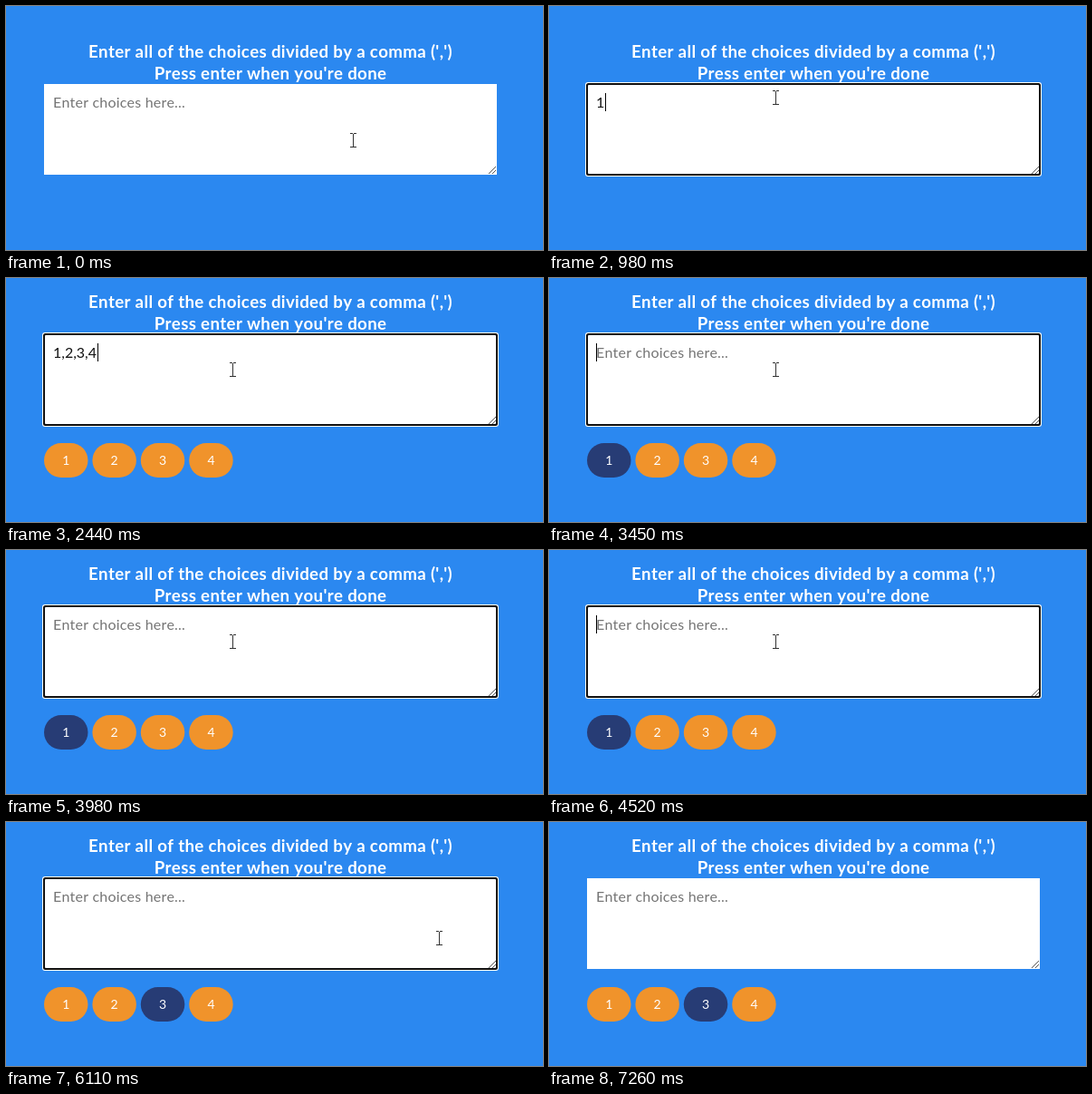
An HTML page with a canvas for the animation above (7.34 s loop, 593 by 269 pixels).

```html
<!DOCTYPE html>
<html lang="en">
<head>
<meta charset="utf-8">
<title>Random choice picker</title>
<style>
  html, body { margin: 0; width: 100%; height: 100%; overflow: hidden; background: #2b88f0; }
  canvas { display: block; }
</style>
</head>
<body>
<canvas id="stage" width="593" height="269"></canvas>
<script>
const ctx = document.getElementById('stage').getContext('2d');
const LOOP = 7340, FOCUS = 210, LAYOUT = 1130, ENTER = 2910, BLUR = 7260;
const BLINK = 530, PICK_START = 3010, PICK_STEP = 100, FINAL_AT = 6110, FINAL = 3;
const PICKS = '3224132241341231424414332412410';

// Time of each typed character, and of each tag's appearance
const KEYS = [[980, '1'], [1350, ','], [1580, '2'], [1740, ','],
              [1890, '3'], [2040, ','], [2370, '4']];
const TAGS = [1130, 1660, 1960, 2440];

// Pointer path: time, x, y
const PATH = [[0, 383, 148], [70, 376, 146], [140, 318, 124], [200, 262, 104], [270, 250, 101],
              [5900, 250, 101], [6110, 478, 128], [6270, 556, 168], [6420, 606, 204]];

function pointerAt(t) {
  const i = PATH.findIndex(p => p[0] > t);
  if (i < 1) return null;
  const [t0, x0, y0] = PATH[i - 1], [t1, x1, y1] = PATH[i];
  const k = (t - t0) / (t1 - t0);
  return [Math.round(x0 + (x1 - x0) * k), Math.round(y0 + (y1 - y0) * k)];
}

function text(str, x, y, color, size, { weight = 400, align = 'left', spacing = 0 } = {}) {
  ctx.font = `${weight} ${size}px Lato, "Open Sans", sans-serif`;
  ctx.fontKerning = 'none';
  ctx.letterSpacing = spacing + 'px';
  ctx.textAlign = align;
  ctx.fillStyle = color;
  ctx.fillText(str, x, y);
  return ctx.measureText(str).width;
}

function box(x, y, w, h, r, color) {
  ctx.fillStyle = color;
  ctx.beginPath();
  ctx.roundRect(x, y, w, h, r);
  ctx.fill();
}

function caretOn(t) {
  const start = t < KEYS[0][0] ? FOCUS : t < 3000 ? t : 3000;
  return Math.floor((t - start) / BLINK) % 2 === 0;
}

function pickedTag(t) {
  if (t >= FINAL_AT) return FINAL;
  return t < PICK_START ? 0 : +PICKS[Math.floor((t - PICK_START) / PICK_STEP)];
}

function drawField(t, top) {
  const focused = t >= FOCUS && t < BLUR;
  if (focused) {
    box(40, top - 2, 504, 104, 3, '#fff');
    box(41, top - 1, 502, 102, 2.5, '#101010');
    box(43, top + 1, 498, 98, 1, '#fff');
  } else {
    box(42, top, 500, 100, 0, '#fff');
  }

  ctx.strokeStyle = '#555';
  ctx.lineWidth = 1;
  ctx.beginPath();
  for (const d of [8, 4]) {
    ctx.moveTo(541 - d, top + 99);
    ctx.lineTo(541, top + 99 - d);
  }
  ctx.stroke();

  const typed = t < ENTER ? KEYS.filter(k => k[0] <= t).map(k => k[1]).join('') : '';
  let caret = 52;
  if (typed) caret += text(typed, 52, top + 26, '#111', 16);
  else text('Enter choices here...', 52, top + 26, '#757575', 16, { spacing: 0.2 });
  if (focused && caretOn(t)) {
    ctx.fillStyle = '#000';
    ctx.fillRect(Math.ceil(caret), top + 10, 1, 20);
  }
}

function drawTags(t) {
  const picked = pickedTag(t);
  TAGS.forEach((at, i) => {
    if (t < at) return;
    const x = 42 + i * 53.4;
    box(x, 182, 48.5, 38, 19, picked === i + 1 ? '#273c75' : '#f0932b');
    text(String(i + 1), x + 24.25, 206, '#fff', 14, { align: 'center' });
  });
}

function drawPointer(t, top) {
  const p = pointerAt(t);
  if (!p) return;
  const [x, y] = p;
  if (x < 542 && y < top + 100) {
    ctx.fillStyle = '#333';
    ctx.fillRect(x, y - 7, 1, 15);
    for (const dy of [-8, 7]) {
      ctx.fillRect(x - 3, y + dy, 3, 1);
      ctx.fillRect(x + 1, y + dy, 3, 1);
    }
    return;
  }
  ctx.beginPath();
  for (const [dx, dy] of [[0, 0], [0, 16], [4, 13], [6, 18], [9, 17], [7, 12], [12, 12]]) {
    ctx.lineTo(x + dx + 0.5, y + dy + 0.5);
  }
  ctx.closePath();
  ctx.fillStyle = '#fff';
  ctx.fill();
  ctx.strokeStyle = '#000';
  ctx.stroke();
}

function draw() {
  const t = performance.now() % LOOP;
  const top = t < LAYOUT ? 86 : 62;
  ctx.fillStyle = '#2b88f0';
  ctx.fillRect(0, 0, 593, 269);
  const heading = { weight: 700, align: 'center', spacing: 0.32 };
  text("Enter all of the choices divided by a comma (',')", 292, top - 29, '#fff', 18.72, heading);
  text("Press enter when you're done", 292, top - 5, '#fff', 18.72, heading);
  drawField(t, top);
  drawTags(t);
  drawPointer(t, top);
  requestAnimationFrame(draw);
}
draw();
</script>
</body>
</html>
```
